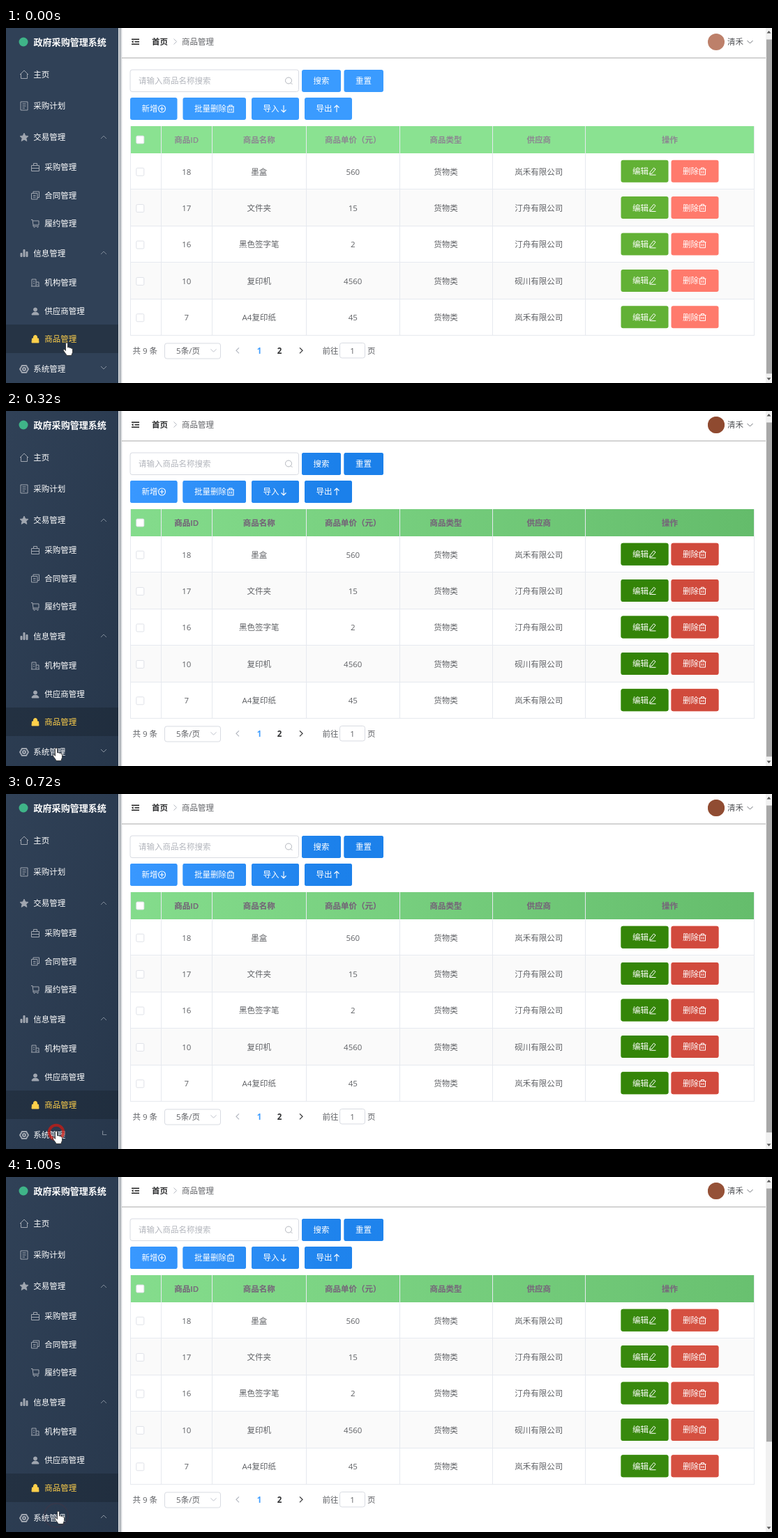
These frames come from a looping animation (1098 px wide and 510 px high, 1.04 s). An HTML page:

```html
<!DOCTYPE html>
<html lang="zh-CN">
<head>
<meta charset="utf-8">
<title>政府采购管理系统</title>
<style>
html, body { margin: 0; width: 100%; height: 100%; overflow: hidden; background: #fff; }
svg { display: block; width: 1098px; height: 510px; }
text { font: 11.5px 'Open Sans', 'Noto Sans CJK SC', 'Noto Sans CJK', sans-serif; }
.dim { opacity: var(--dim); }
</style>
</head>
<body>
<svg id="stage" viewBox="0 0 1098 510">
  <defs>
    <linearGradient id="blue" gradientUnits="userSpaceOnUse" x1="178" x2="470" y1="0" y2="0">
      <stop stop-color="#3998ff"/><stop offset="1" stop-color="#1b80ea"/>
    </linearGradient>
    <linearGradient id="head" gradientUnits="userSpaceOnUse" x1="178" x2="1073" y1="0" y2="0">
      <stop stop-color="#84dc8c"/><stop offset="1" stop-color="#64bc6b"/>
    </linearGradient>
    <linearGradient id="shade" x1="0" y1="0" x2="1" y2="1">
      <stop stop-color="#0f1c2c" stop-opacity="0"/><stop offset="1" stop-color="#0f1c2c" stop-opacity=".28"/>
    </linearGradient>
    <linearGradient id="edge">
      <stop stop-color="#8d949c"/><stop offset="1" stop-color="#fff"/>
    </linearGradient>
  </defs>
</svg>
<script>
const stage = document.getElementById('stage');

function add(tag, attrs, content) {
  const el = document.createElementNS('http://www.w3.org/2000/svg', tag);
  for (const key in attrs) el.setAttribute(key, attrs[key]);
  if (content !== undefined) el.textContent = content;
  return stage.appendChild(el);
}
const rect = (x, y, width, height, fill, more) => add('rect', { x, y, width, height, fill, ...more });
const line = (d, stroke, width = 1) => add('path', { d, stroke, 'stroke-width': width, fill: 'none' });
const icon = (x, y, d, stroke, fill = 'none', width = 1) =>
  add('path', { d, stroke, fill, 'stroke-width': width, transform: `translate(${x} ${y})` });

// Text is placed by its vertical centre.
function label(x, cy, str, fill, { anchor = 'start', size = 11.5, weight = 400 } = {}) {
  return add('text', { x, y: cy + size * .37, fill, 'text-anchor': anchor,
    style: `font-size:${size}px;font-weight:${weight}` }, str);
}
const centred = (x, cy, str, fill, weight) => label(x, cy, str, fill, { anchor: 'middle', weight });

// A shape in its bright colour with the dimmed colour fading over it.
function tinted(x, y, w, h, bright, dark, rx = 0) {
  rect(x, y, w, h, bright, { rx });
  rect(x, y, w, h, dark, { rx, class: 'dim' });
}

const GREY = '#a0a6b0', TEXT = '#606266', BORDER = '#e6e9ef', FIELD = '#d8dbe2';
const UP = 'M-4 2L0-2L4 2', DOWN = 'M-4-2L0 2L4-2', LEFT = 'M2-4L-2 0L2 4', RIGHT = 'M-2-4L2 0L-2 4';
const TRASH = 'M-5-3H5M-2-3V-5H2V-3M-4-3V5H4V-3M-1.3-.5V2.7M1.3-.5V2.7';
const PEN = 'M-3 1L2-5L4.5-3L-.5 3L-4 4ZM-4 5.2H5';

function sidebar() {
  rect(0, 0, 161, 510, '#304157');
  rect(0, 426, 161, 41, '#263445');
  rect(0, 0, 161, 510, 'url(#shade)', { class: 'dim' });
  add('circle', { cx: 25, cy: 20, r: 6.5, fill: '#3fb488' });
  label(39.5, 20, '政府采购管理系统', '#fff', { size: 13.05, weight: 700 });

  const menu = [
    [26, 67, '主页', 'M-6 0L0-6L6 0M-4.5-1V5.5H4.5V-1'],
    [26, 112, '采购计划', 'M-5-6H5V6H-5ZM-2.5-3H2.5M-2.5 0H2.5M-2.5 3H1'],
    [26, 157, '交易管理', 'M0-6L1.8-2L6-1.6L2.8 1.2L3.8 5.4L0 3.2L-3.8 5.4L-2.8 1.2L-6-1.6L-1.8-2Z', 1],
    [42, 200, '采购管理', 'M-5.5-2.5H5.5V5.5H-5.5ZM-2.5-2.5V-5.5H2.5V-2.5M-5.5 1.5H5.5'],
    [42, 240.5, '合同管理', 'M-5.5-3H3V5.5H-5.5ZM-3-3V-5.5H5.5V3H3M-3 0H.5M-3 2.5H.5'],
    [42, 281, '履约管理', 'M-6-5.5H-4L-3 2H5V-4H-4M-3 2V4H5M-2 5.5H-1M3 5.5H4'],
    [26, 323.5, '信息管理', 'M-5 0H-3V5H-5ZM-1-5H1V5H-1ZM3-2H5V5H3Z', 1],
    [42, 366, '机构管理', 'M-5 5V-5H1V5M1-1H5V5M-6 5H6M-3-2H-1M-3 1H-1M3 2V3'],
    [42, 407, '供应商管理', 'M0-5A2.5 2.5 0 0 1 0 0A2.5 2.5 0 0 1 0-5M-5 5C-5 0 5 0 5 5Z', 1],
    [42, 447, '商品管理', 'M-4.5-1H4.5L5 5H-5ZM-2.5-1V-3A2.5 2.5 0 0 1 2.5-3V-1', 1],
    [26, 490, '系统管理', 'M-3-5H3L6 0L3 5H-3L-6 0ZM0-2A2 2 0 0 1 0 2A2 2 0 0 1 0-2'],
  ];
  for (const [x, y, name, d, solid] of menu) {
    const active = name === '商品管理';
    const color = active ? '#ffd04b' : GREY;
    icon(x, y, d, color, solid ? color : 'none', name === '系统管理' ? 2 : 1);
    label(x + 13.3, y, name, active ? color : '#fff', { weight: 500 });
  }
  icon(140, 157, UP, '#7f8a98');
  icon(140, 323, UP, '#7f8a98');
}

function topbar() {
  rect(161, 0, 1.5, 510, '#dfe2e6');
  rect(162.5, 0, 4.5, 510, 'url(#edge)');
  rect(166, 42.5, 923, 1, '#a9a9a9');
  line('M180 16.2H191M184.5 19.7H191M180 23.2H191', '#222', 1.6);
  icon(181.5, 19.7, 'M-1.5 0L1-2V2Z', 'none', '#222');
  label(209, 19.5, '首页', '#303133', { weight: 700 });
  icon(242.5, 19.5, RIGHT, '#b4b8c0');
  label(252, 19.5, '商品管理', TEXT);
  add('circle', { cx: 1018, cy: 20, r: 12, fill: '#bd806a' });
  add('circle', { cx: 1018, cy: 20, r: 12, fill: '#8f4a30', class: 'dim' });
  label(1034, 20, '清禾', '#505256');
  icon(1066.5, 20, DOWN, '#707379');
}

function toolbar() {
  rect(178, 60, 241.5, 31.5, '#fff', { rx: 3, stroke: FIELD });
  label(190, 76, '请输入商品名称搜索', '#b3b6bd');
  icon(405, 75.5, 'M0-4.5A4.5 4.5 0 0 1 0 4.5A4.5 4.5 0 0 1 0-4.5M3.2 3.2L5.5 5.5', '#b3b6bd');
  const buttons = [
    [424, 60, 56, '搜索'],
    [484.5, 60, 56.5, '重置'],
    [178, 100, 67.5, '新增', 'M0-5A5 5 0 0 1 0 5A5 5 0 0 1 0-5M-3 0H3M0-3V3'],
    [253.5, 100, 90.5, '批量删除', TRASH],
    [352, 100, 68, '导入', 'M0-5V5M-3.5 1.5L0 5L3.5 1.5'],
    [428, 100, 68, '导出', 'M0 5V-5M-3.5-1.5L0-5L3.5-1.5'],
  ];
  for (const [x, y, w, name, d] of buttons) {
    tinted(x, y, w, 32, '#3a9bff', 'url(#blue)', 3);
    label(x + 16.5, y + 16, name, '#fff', { weight: 500 });
    if (d) icon(x + w - 22, y + 16, d, '#fff', 'none', 1.1);
  }
}

function table() {
  const edges = [178, 222.5, 295, 430.5, 564, 697, 830.5, 1072.5];
  const mid = i => (edges[i] + edges[i + 1]) / 2;
  const top = 180, step = 52.4;
  const checkbox = (cy, stroke) => rect(186.8, cy - 5.5, 11, 11, '#fff', { rx: 1.5, stroke });

  tinted(178, 141, 895, 39, '#8ae291', 'url(#head)');
  ['商品ID', '商品名称', '商品单价（元）', '商品类型', '供应商', '操作'].forEach((name, i) => {
    centred(mid(i + 1), 160.5, name, '#8c8791', 600);
    centred(mid(i + 1), 160.5, name, '#716a75', 600).setAttribute('class', 'dim');
  });
  checkbox(160.5, '#dcdfe6');

  const rows = [
    [18, '墨盒', 560, '岚禾有限公司'],
    [17, '文件夹', 15, '汀舟有限公司'],
    [16, '黑色签字笔', 2, '汀舟有限公司'],
    [10, '复印机', 4560, '砚川有限公司'],
    [7, 'A4复印纸', 45, '岚禾有限公司'],
  ];
  rows.forEach(([id, name, price, supplier], r) => {
    const y = top + r * step, cy = y + 26.2;
    if (r % 2) rect(178, y, 895, step, '#fafafa');
    line(`M178 ${Math.round(y + step) - .5}H1073`, BORDER);
    checkbox(cy + .5, '#dfe2e8');
    [id, name, price, '货物类', supplier].forEach((v, i) => centred(mid(i + 1), cy + .2, v, TEXT));
    tinted(881.5, cy - 16.5, 68, 32, '#62b135', '#338408', 3);
    tinted(953.5, cy - 16.5, 68, 32, '#ff7a6c', '#d04a3c', 3);
    label(898, cy - .3, '编辑', '#fff', { weight: 500 });
    label(970, cy - .3, '删除', '#fff', { weight: 500 });
    icon(926.5, cy - .3, PEN, '#fff');
    icon(998.5, cy - .3, TRASH, '#fff');
  });
  for (const x of edges) line(`M${Math.floor(x) + .5} 141V441.5`, BORDER);
}

function pager() {
  const y = 463.3;
  label(181.5, y, '共 9 条', TEXT);
  rect(227.5, 453, 80, 22, '#fff', { rx: 3, stroke: FIELD });
  centred(261, y, '5条/页', TEXT);
  icon(297.5, y, DOWN, '#c0c4cc');
  icon(332, y, LEFT, '#b4b8c0', 'none', 1.2);
  centred(363, y, '1', '#409eff', 700);
  centred(392, y, '2', '#303133', 700);
  icon(423, y, RIGHT, '#303133', 'none', 1.2);
  label(453.5, y, '前往', TEXT);
  rect(478.5, 452.5, 36, 21.5, '#fff', { rx: 3, stroke: FIELD });
  centred(496.5, y, '1', TEXT);
  label(518, y, '页', TEXT);
}

sidebar();
topbar();
toolbar();
table();
pager();

rect(1089, 0, 9, 510, '#f1f1f1');
icon(1093.5, 6, 'M-3 1.5L0-2L3 1.5Z', 'none', '#555');
icon(1093.5, 504, 'M-3-1.5L0 2L3-1.5Z', 'none', '#555');
const thumb = rect(1090, 16.5, 8, 480, '#a8a8a8');
const arrow = icon(140, 488, DOWN, '#8a94a1');
const ring = add('circle', { cx: 72, cy: 486, fill: 'none', stroke: '#d8180e' });
const hand = add('path', { fill: '#fff', stroke: '#333', 'stroke-width': .9,
  d: 'M4 1.5a1.5 1.5 0 0 1 3 0V7c1-.7 2.3-.4 2.6.5 1-.5 2-.1 2.4.8 1-.3 2 .2 2 1.5v3.5c0 2-1.5 3-1.5 5.2H5.5c0-1.5-3-4-4.5-7-.8-1.6 1-2.4 2-1.2l1 1.2z' });

// Piecewise linear value through [time, value] points.
function track(t, points) {
  let [t0, v0] = points[0];
  for (const [t1, v1] of points) {
    if (t < t1) return v0 + (v1 - v0) * (t - t0) / (t1 - t0);
    [t0, v0] = [t1, v1];
  }
  return v0;
}

// CSS cubic-bezier, solved by bisection.
function bezier(x, x1, y1, x2, y2) {
  const at = (s, a, b) => 3 * s * (1 - s) ** 2 * a + 3 * s * s * (1 - s) * b + s ** 3;
  let lo = 0, hi = 1;
  for (let i = 0; i < 24; i++) {
    const s = (lo + hi) / 2;
    if (at(s, x1, x2) < x) lo = s; else hi = s;
  }
  return at(lo, y1, y2);
}

function draw(t) {
  stage.style.setProperty('--dim', track(t, [[0, 0], [120, 1], [640, 1], [1000, .88]]));

  const x = track(t, [[0, 87], [160, 72], [840, 72], [1000, 75]]);
  const y = track(t, [[0, 452], [160, 478], [320, 484], [840, 484], [1000, 480]]);
  hand.setAttribute('transform', `translate(${x - 5.5} ${y})`);

  const outer = track(t, [[440, 2], [480, 4], [640, 9.5], [800, 15], [1000, 18]]);
  const inner = track(t, [[480, 0], [640, 4.5], [800, 12], [1000, 16]]);
  ring.setAttribute('r', (outer + inner) / 2);
  ring.setAttribute('stroke-width', outer - inner);
  ring.setAttribute('opacity', t < 440 ? 0 : track(t, [[440, 1], [560, 1], [640, .9], [800, .5], [1000, .06]]));

  const open = Math.min(1, Math.max(0, (t - 665) / 300));
  arrow.setAttribute('transform', `translate(140 488) rotate(${180 * bezier(open, .25, .1, .25, 1)})`);
  const content = 510 + 163 * bezier(open, .42, 0, .58, 1);
  thumb.setAttribute('height', 480 * 510 / content);
}

function tick(now) {
  draw(Math.floor(now % 1040 / 40) * 40);
  requestAnimationFrame(tick);
}
draw(0);
requestAnimationFrame(tick);
</script>
</body>
</html>
```
